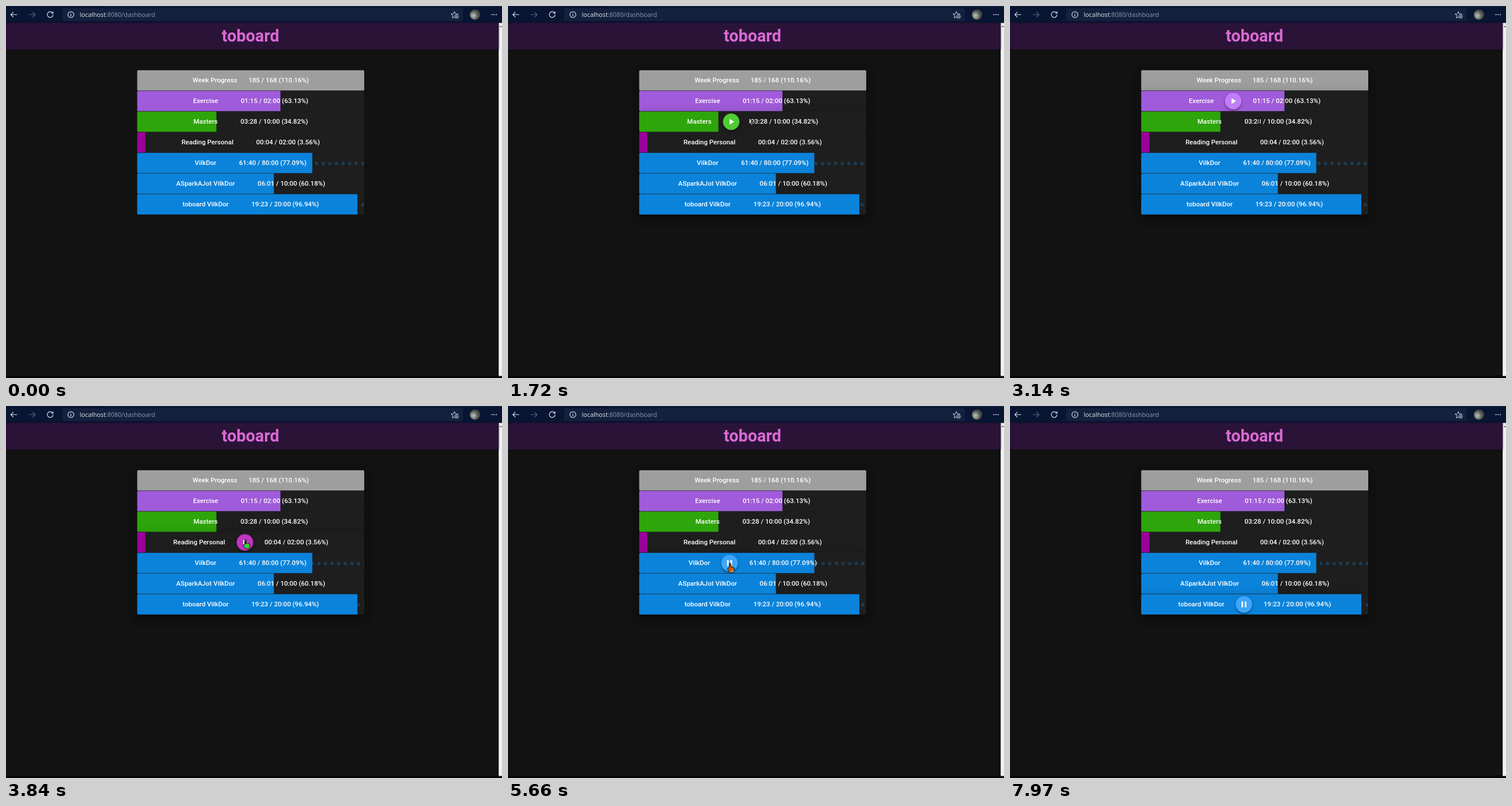
These frames come from a looping animation (864 px wide and 648 px high, 8000 ms). An HTML page:

```html
<!DOCTYPE html>
<html lang="en">
<head>
<meta charset="utf-8">
<title>toboard</title>
<style>
  html, body { margin: 0; width: 100%; height: 100%; overflow: hidden; background: #121212; }
  #browser, .cursor { position: absolute; left: 0; top: 0; width: 864px; height: 648px; }
  #browser text { font: 10.8px "Open Sans", sans-serif; }
  #page { position: absolute; left: 0; top: 0; width: 1192px; height: 894px; transform: scale(.72);
    transform-origin: 0 0; font: 500 16px/50px Roboto, sans-serif; color: #fff; }
  h1 { position: absolute; left: 0; top: 41px; width: 1183px; height: 64px; margin: 0; padding-right: 9px;
    font: 700 40px/64px Roboto, sans-serif; text-align: center; color: #da6ad4; background: #2b1338;
    box-shadow: 0 1px 5px #0009; }
  #rows { position: absolute; left: 317px; top: 155px; width: 550px; overflow: hidden; border-radius: 4px; }
  .row { position: relative; height: 50px; border-radius: 4px; }
  .hover { box-shadow: 0 7px 8px -4px #0003, 0 12px 17px 2px #00000024, 0 5px 22px 4px #0000001f; }
  .bar, .dots, .fill, .content { position: absolute; left: 0; top: 0; width: 100%; height: 100%; }
  .bar { overflow: hidden; border-radius: 4px; background: #1e1e1e; }
  .dots { top: 1px; background-size: 16px 100%; }
  .content { display: flex; justify-content: center; align-items: center; white-space: nowrap; }
  .label { margin-right: var(--gap); }
  .value { margin-left: var(--gap); }
  .button { display: none; width: 40px; height: 40px; border-radius: 50%; box-shadow: 0 3px 6px #0006; }
  .row.hover .button { display: block; }
  .button svg { display: block; width: 24px; margin: 8px; fill: #fff; }
  .ink { fill: #fff; mix-blend-mode: difference; }
  .edge { fill: none; stroke: #000; stroke-width: .9; stroke-linejoin: round; }
</style>
</head>
<body>
<svg id="browser" fill="none" stroke="#e4e8f0" stroke-width="1.1">
  <g stroke="none">
    <path fill="#091633" d="M0 0H864V29.5H0z"/>
    <path fill="#0d2a4a" d="M173 0H864V1H173z"/>
    <rect fill="#13213f" x="98" y="4" width="698" height="22" rx="3"/>
    <path fill="#090408" d="M0 644H864V648H0z"/>
    <path fill="#f1f1f1" d="M858.24 29.5H864V644.5H858.24z"/>
    <path fill="#777" d="M859.5 37l2.5-3 2 3z"/>
    <circle fill="url(#photo)" cx="817" cy="15" r="9"/>
    <g fill="#e4e8f0">
      <circle cx="846.5" cy="15" r="1"/><circle cx="850.2" cy="15" r="1"/><circle cx="854" cy="15" r="1"/>
      <text x="128.5" y="19">localhost<tspan fill="#8f99ab">:8080/dashboard</tspan></text>
    </g>
  </g>
  <radialGradient id="photo" cx=".35" cy=".6">
    <stop stop-color="#c4c7c0"/><stop offset=".55" stop-color="#7d817b"/><stop offset="1" stop-color="#454a48"/>
  </radialGradient>
  <path d="M19.5 15H8.5M13 10.3L8.3 15 13 19.7"/>
  <path stroke="#5c6780" d="M39.5 15h11M46 10.3l4.7 4.7-4.7 4.7"/>
  <path d="M81.2 12.2A5 5 0 1 0 82 15M82 9.6v3.2h-3.4"/>
  <circle cx="113" cy="15" r="5.2"/><path d="M113 14v4M113 11.8v1.2"/>
  <path stroke="#b5bccb" d="M781 19l-3.4 1.8.7-4-2.8-2.8 3.9-.5 1.7-3.5 1.7 3.5 4 .5-1.2 1.2"/>
  <circle stroke="#b5bccb" cx="784.8" cy="18.3" r="3"/><path stroke="#b5bccb" d="M783.3 18.3h3M784.8 16.8v3"/>
</svg>
<div id="page">
  <h1>toboard</h1>
  <div id="rows"></div>
</div>
<svg class="cursor ink"><path/></svg>
<svg class="cursor edge"><path/></svg>
<script>
const LOOP = 8000, TICK = 101, LAG = 100, TOP = 111.6, ROW = 36;
const BLUE = ['#0b83da', '#3ea5fc'];

// label, value, percent, [bar colour, button colour], running
const tasks = [
  ['Week Progress', '185 / 168 (110.16%)', 100, ['#9e9e9e', '#9e9e9e']],
  ['Exercise', '01:15 / 02:00 (63.13%)', 63.13, ['#9f5bd9', '#c07efa']],
  ['Masters', '03:28 / 10:00 (34.82%)', 34.82, ['#2ea50b', '#50cb35']],
  ['Reading Personal', '00:04 / 02:00 (3.56%)', 3.56, ['#9a009a', '#c233c2']],
  ['VilkDor', '61:40 / 80:00 (77.09%)', 77.09, BLUE, true],
  ['ASparkAJot VilkDor', '06:01 / 10:00 (60.18%)', 60.18, BLUE],
  ['toboard VilkDor', '19:23 / 20:00 (96.94%)', 96.94, BLUE, true],
];
const PLAY = 'M8 5.1v14l11-7z', PAUSE = 'M14 19h4V5h-4zM6 19h4V5H6z';

// time, x, y of the pointer
const track = [
  [400, 725, 660], [900, 513, 509], [1000, 510, 505], [1600, 424, 212], [1700, 420, 195],
  [2100, 440, 160], [2450, 468, 124], [2700, 470, 150], [3000, 442, 170], [3120, 434, 201],
  [3500, 425, 207], [3700, 418, 232], [4350, 412, 240], [4500, 411, 259], [4730, 411, 278],
  [5100, 400, 279], [5400, 386, 273], [6000, 388, 276], [6250, 404, 298], [6550, 410, 306],
  [6900, 411, 312], [7100, 412, 340], [7870, 412, 342], [7970, 469, 309],
];
const shapes = {
  arrow: 'M0 0V11.3L2.6 9 4.3 12.8 6.1 12 4.5 8.2H8z',
  hand: 'M-1.5 8V1.2a1.5 1.5 0 0 1 3 0V6l4.6 1q1.7.4 1.5 2L7 13.5 6 16H0L-4.5 10.5a1.3 1.3 0 0 1 2-1.6z',
  beam: 'M-2.5-6.5h5v1h-2v11h2v1h-5v-1h2v-11h-2z',
};

const dotImage = 'radial-gradient(circle, #193d57 3.7px, transparent 4.3px)';
const list = document.getElementById('rows');
list.innerHTML = tasks.map(([label, value, percent, [color, light], running], i) => `
  <div class="row" style="--gap:${i ? 27.5 : 13.75}px">
    <div class="bar">
      ${running ? `<div class="dots" style="background-image:${dotImage}"></div>` : ''}
      <div class="fill" style="width:${percent}%;background:${color}"></div>
    </div>
    <div class="content">
      <span class="label">${label}</span>
      <span class="button" style="background:${light}"><svg viewBox="0 0 24 24"><path d="${running ? PAUSE : PLAY}"/></svg></span>
      <span class="value">${value}</span>
    </div>
  </div>`).join('');

const rows = [...list.children];
const dots = document.querySelectorAll('.dots');
const cursor = document.querySelectorAll('.cursor path');

function pointerAt(t) {
  const next = track.findIndex(key => key[0] > t);
  if (next === 0) return track[0].slice(1);
  if (next < 0) return track[track.length - 1].slice(1);
  const [t0, x0, y0] = track[next - 1], [t1, x1, y1] = track[next];
  const u = (t - t0) / (t1 - t0), ease = u * u * (3 - 2 * u);
  return [x0 + (x1 - x0) * ease, y0 + (y1 - y0) * ease];
}

const rowAt = ([x, y]) => x > 228 && x < 624 ? Math.floor((y - TOP) / ROW) : -1;

function cursorShape([x, y], active) {
  const row = rowAt([x, y]);
  const button = rows[active]?.querySelector('.button').getBoundingClientRect();
  if (button && Math.hypot(x - button.x - 14.4, y - button.y - 14.4) < 14.4) return 'hand';
  const overText = x > 422 && x < 545 && Math.abs(y - TOP - ROW * (row + 0.5)) < 8;
  return rows[row] && overText ? 'beam' : 'arrow';
}

function draw() {
  const now = performance.now() % LOOP;
  const t = Math.max(0, Math.floor((now + 9) / TICK) * TICK - 9);
  const active = rowAt(pointerAt(t - LAG));
  list.classList.toggle('hover', active in rows);
  rows.forEach((row, i) => row.classList.toggle('hover', i > 0 && i === active));
  dots.forEach(d => d.style.backgroundPositionX = 10.3 - 16 * (t / 500 % 1) + 'px');

  const point = pointerAt(t), d = shapes[cursorShape(point, active)];
  cursor.forEach(path => {
    path.setAttribute('d', d);
    path.setAttribute('transform', `translate(${point})`);
  });
  requestAnimationFrame(draw);
}
draw();
</script>
</body>
</html>
```
